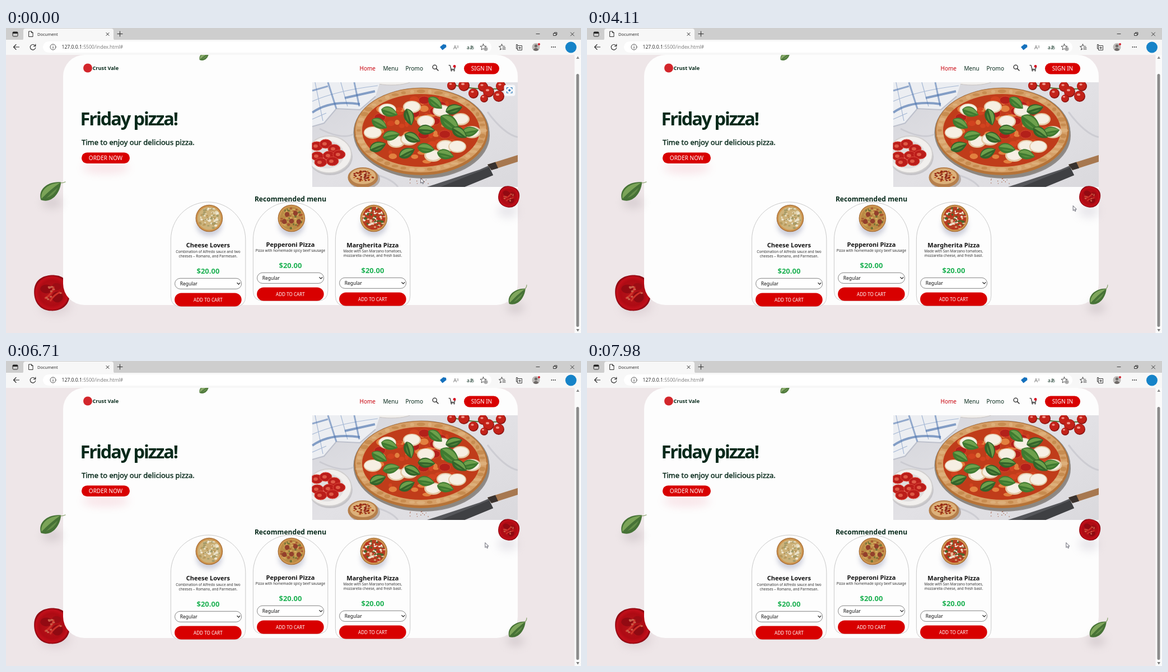
These frames come from a looping animation (1027x545 px, 8000 ms). An HTML page:

```html
<!DOCTYPE html>
<html lang="en">
<head>
<meta charset="utf-8">
<title>Pizza shop</title>
<style>
  html, body { margin: 0; width: 100%; height: 100%; overflow: hidden; background: #eee6e8; }
  svg { display: block; width: 1027px; height: 545px; }
  text { font-family: "Noto Sans", "Open Sans", sans-serif; fill: #06291a; }
  .ui { font-family: "Open Sans", "Noto Sans", sans-serif; fill: #222; }
  .mid { text-anchor: middle; }
  .bold { font-weight: 700; }
  .medium { stroke: #06291a; stroke-width: .4px; }
  .line { fill: none; stroke: #2b2b2b; stroke-linecap: round; stroke-linejoin: round; }
</style>
</head>
<body>
<svg id="stage" viewBox="0 0 1027 545" xmlns="http://www.w3.org/2000/svg"></svg>
<script>
const LOOP = 8000;
const RED = '#d80000';

let seed = 7;
const random = () => (seed = seed * 16807 % 2147483647) / 2147483647;
const between = (a, b) => a + (b - a) * random();
const times = (n, make) => Array.from({ length: n }, (_, i) => make(i)).join('');

const rect = (x, y, w, h, r, fill, extra = '') =>
  `<rect x="${x}" y="${y}" width="${w}" height="${h}" rx="${r}" fill="${fill}" ${extra}/>`;
const oval = (x, y, rx, ry, fill, extra = '') =>
  `<ellipse cx="${x}" cy="${y}" rx="${rx}" ry="${ry}" fill="${fill}" ${extra}/>`;
const dot = (x, y, r, fill, extra) => oval(x, y, r, r, fill, extra);
const shape = (d, fill, extra = '') => `<path d="${d}" fill="${fill}" ${extra}/>`;
const line = (d, width = 1, extra = '') => `<path class="line" d="${d}" stroke-width="${width}" ${extra}/>`;
const label = (x, y, size, words, cls = '', style = '') =>
  `<text x="${x}" y="${y}" font-size="${size}" class="${cls}" style="${style}">${words}</text>`;

// Leaf of half-length `size`, pointing along `angle`, with one half lit.
const leaf = (x, y, size, angle, fill, light, width = 1) =>
  `<g transform="translate(${x} ${y}) rotate(${angle}) scale(${size} ${size * width})">
    ${shape('M-1 .05C-.7-.75 .3-.75 1 0C.3 .7-.6 .75-1 .05', fill)}
    ${shape('M-.9 0C-.6-.55 .25-.6 .9-.02Q0-.1-.9 0', light)}
    ${shape('M-.6 .2Q0 .12 .55 .15Q0 .45-.6 .2', light, 'opacity=".55"')}</g>`;

// Random point inside an ellipse, as [x, y].
function scatter(cx, cy, rx, ry) {
  const a = between(0, Math.PI * 2), d = Math.sqrt(random());
  return [cx + Math.cos(a) * rx * d, cy + Math.sin(a) * ry * d];
}

function tomatoSlice(x, y, r, angle) {
  return `<g transform="translate(${x} ${y}) rotate(${angle}) scale(${r})">
    ${shape('M-.98-.1C-.95-.8-.4-1 .15-.98C.8-.95 1-.4 .98 .1C.95 .75 .45 1-.05 .98C-.6 .97-1 .55-.98-.1Z', 'url(#tomato)')}
    ${oval(-.3, -.22, .34, .24, '#920a12')}${oval(.3, .22, .3, .3, '#8f0a12')}${oval(.25, -.35, .25, .2, '#9c0d14')}
    ${shape('M-.4 .3Q0 .1 .1-.35M-.1 .45Q.1 .1 .45-.05', 'none', 'stroke="#cf3129" stroke-width=".1"')}
    ${times(10, () => { const [u, v] = scatter(0, 0, .5, .45); return oval(u, v, .07, .05, '#c9604a'); })}</g>`;
}

function browser() {
  return rect(0, 0, 1027, 22, 0, '#cecece') + rect(0, 21, 1027, 27, 0, '#f7f7f7') +
    shape('M27 22Q31 22 31 18V5Q31 1 35 1H188Q192 1 192 5V18Q192 22 196 22Z', '#f7f7f7') +
    rect(66, 24, 801, 20, 10, '#fff') +
    rect(12, 7, 9, 8, 1.5, 'none', 'stroke="#222"') + rect(12, 7, 9, 3, 1, '#222') +
    line('M41 6H45.5L48 8.5V15.5H41ZM45.5 6V8.5H48') +
    label(56, 13.5, 7.5, 'Document', 'ui') +
    line('M179 8.5L184 13.5M184 8.5L179 13.5M199 10.5H208M203.5 6V15') +
    line('M947 10.5H953M1008.5 8L1014.5 14M1014.5 8L1008.5 14', .9) +
    line('M978 9.5H982.5V13.5H978ZM979.5 9.5V8H984V12H982.5', .9) +
    line('M13.5 34H23.5M18 29.5L13.5 34L18 38.5', 1.1) +
    line('M52.3 32A4.8 4.8 0 1 0 52.8 35M52.8 29V32.5H49.2', 1.1) +
    `<circle cx="84" cy="34" r="5" class="line" stroke-width=".8"/>` + line('M84 33.5V36.5M84 31.5V31.6', .9) +
    label(99.5, 37.2, 8.6, '127.0.0.1<tspan fill="#777">:5500/index.html#</tspan>', 'ui') +
    shape('M775 34L781 29L786 30L786.5 34L779.5 39.5Z', '#1571bd') +
    label(799, 38, 9.5, 'A<tspan font-size="6" dy="-3">))</tspan>', 'ui', 'fill:#666') +
    label(823, 37.5, 8.5, 'aあ', '', 'font-family:"Open Sans","Noto Sans CJK JP",sans-serif;fill:#555') +
    line('M852.5 28.5L854 32.2L858 32.5L855 35L856 39L852.5 37L849 39L850 35L847 32.5L851 32.2Z', .8) +
    dot(857, 37.5, 3, '#f7f7f7', 'stroke="#555" stroke-width=".8"') + line('M855.5 37.5H858.5M857 36V39', .7) +
    line('M885.5 29L887 32.5L891 33M885.5 29L884 32.5L880.5 33L883.5 35.5L882.5 39L885 37.5M887 35.5H892M887 38H892', .9) +
    line('M913.5 31V29.5H911.5V37H913.5M914 31.5H921.5V39.5H914ZM917.7 33.5V37.5M915.7 35.5H919.7', .9) +
    dot(946.5, 34, 7, '#bdbab8') + dot(946.5, 32, 2.6, '#6d6967') + shape('M941.5 39Q946.5 32 951.5 39Q946.5 43 941.5 39', '#6d6967') +
    dot(952, 29, 2, '#d21f2b') +
    times(3, i => dot(974.5 + i * 3.2, 34, .9, '#222')) +
    dot(1009, 34.5, 10, '#1683c8');
}

function scrollbar() {
  return rect(1015.5, 48, 11.5, 497, 0, '#fafafa') + rect(1018.5, 82, 5, 452, 2.5, '#8b8b8b') +
    shape('M1018.5 55L1021.3 50.5L1024 55Z', '#888') + shape('M1018.5 538L1021.3 542.5L1024 538Z', '#777');
}

function pizzaPhoto() {
  const cheese = [[681, 146], [697, 203], [720, 199], [750, 167], [812, 163], [785, 211], [806, 212], [763, 228], [778, 148], [655, 187], [832, 186], [725, 141]];
  const basil = [[767, 134, 40], [800, 145, -15], [685, 150, 20], [720, 159, 75], [667, 171, 30], [726, 196, 25], [793, 170, 40], [664, 212, -20],
    [688, 192, -10], [751, 182, 5], [750, 215, 10], [716, 223, -25], [829, 185, -10], [810, 187, 35], [785, 226, 15]];
  const stripe = (d, width, opacity) => shape(d, 'none', `stroke="#4a72ae" stroke-opacity="${opacity}" stroke-width="${width}"`);
  return `<g clip-path="url(#photo)">
    ${rect(547, 97, 367, 187, 0, 'url(#marble)')}
    ${shape('M860 150Q890 190 914 195M560 180Q600 200 620 190M700 284Q690 270 660 262', 'none', 'stroke="#bcbcc3" stroke-width="3" opacity=".5"')}
    ${oval(688, 91, 40, 11, '#f0eeec', 'stroke="#c6c2c0"')}
    ${shape('M547 97H668L660 122L632 146L590 144L568 170L547 176Z', '#eceef2')}
    ${shape('M547 176L568 170L590 144L632 146L660 122', 'none', 'stroke="#aeb3c0" stroke-width="2" opacity=".7"')}
    ${stripe('M547 151Q580 128 632 136M605 125L659 113', 4, .65)}
    ${stripe('M575 97L590 144M622 97L631 140M547 112L575 104', 3, .55)}
    ${stripe('M552 97L566 166M598 97L610 140M547 131Q590 112 664 103M547 163L572 152', 1.2, .45)}
    ${oval(745, 192, 119, 77, '#5d5650', 'opacity=".6"')}${oval(742, 187, 121.5, 80.5, '#8d8780')}
    ${oval(741.5, 185, 119.5, 78, '#b67337')}${oval(741, 183, 117, 75, '#d6a068')}
    ${times(44, i => oval(741 + 111 * Math.cos(i / 7), 183 + 70 * Math.sin(i / 7), between(3, 8), between(2, 4), random() < .5 ? '#e3b987' : '#bf7f41', 'opacity=".6"'))}
    ${oval(741, 183, 105, 65, '#c03c1a')}
    ${times(60, () => { const [x, y] = scatter(741, 183, 97, 59); return oval(x, y, between(3, 9), between(2, 6), random() < .6 ? '#d2431f' : '#e2803f'); })}
    ${times(14, () => { const [x, y] = scatter(741, 183, 92, 55); return oval(x, y, 10, 7, '#b3201a', 'stroke="#d8452f"'); })}
    ${cheese.map(([x, y]) => oval(x, y, 16, 11, '#e4c9a6') + oval(x, y - .5, between(12, 15), between(8, 10), '#f6efe3')).join('')}
    ${basil.map(([x, y, a], i) => leaf(x, y, i === 6 ? 21 : 15.5, a, i % 2 ? '#33642a' : '#3f7a30', '#6da04c', 1.05)).join('')}
    ${shape('M790 99Q830 112 890 108', 'none', 'stroke="#56783a" stroke-width="2"')}
    ${[[796, 103, 8], [818, 103, 10], [835, 117, 9], [852, 105, 9], [862, 114, 10], [854, 126, 7], [884, 104, 9], [880, 122, 10]]
      .map(([x, y, r]) => dot(x, y, r, '#8e1512') + dot(x - .6, y - .8, r - 1, '#c32219') + oval(x - 2, y - 3, r * .3, r * .2, '#f0958a')).join('')}
    ${oval(579, 230, 40, 33, '#aaa7ab', 'opacity=".5"')}${oval(577, 226, 40, 33, '#f1efed', 'stroke="#d1cfcf" stroke-width="2"')}
    ${oval(573, 226, 31, 25, '#dfdddd')}
    ${[[555, 211], [571, 207], [586, 216], [556, 229], [577, 228], [595, 226], [562, 240], [583, 238]]
      .map(([x, y]) => oval(x, y, 11, 8, '#bb1d1a', 'stroke="#dd4a3c"') + oval(x - 2, y, 4, 3, '#de5a46')).join('')}
    ${oval(640, 270, 28, 18, '#8b7b70', 'opacity=".5"')}${oval(637.5, 267, 27, 18, '#b67f4b')}${oval(637.5, 265, 23, 14, '#dcb17a')}
    ${times(50, () => { const [x, y] = scatter(638, 265, 18, 10); return oval(x, y, 2, 1.2, random() < .6 ? '#8e2415' : '#c4692a'); })}
    ${shape('M752 284L846 253L862 246L870 263L819 284Z', '#55565a')}${shape('M776 284L863 249L870 263L819 284Z', '#3f4043')}
    ${shape('M860 244L914 227V239L867 254Z', '#a77850')}${shape('M860 244L874 239.5L879 250.5L867 254Z', '#39322f')}
    ${times(12, () => dot(between(715, 757), between(268, 278), .7, '#9b4a2c'))}</g>`;
}

function smallPizza(x, base, toppings) {
  return oval(x, 352, 23, 20, '#8589a8', 'opacity=".4" filter="url(#soft)"') +
    dot(x, 340, 24.3, '#a87038') + dot(x, 340, 23, '#cf9650') + dot(x, 340, 20.5, base) +
    times(80, i => { const [u, v] = scatter(x, 340, 19, 19); return oval(u, v, between(1.2, 3), between(1, 2.4), toppings[i % toppings.length]); });
}

// `titleY` and `dy` shift the heading block and the controls separately.
function product({ x, titleY, dy, name, lines, base, toppings, extras = '' }) {
  const mid = x + 66.5, bottom = 497.5 + dy;
  return `<path d="M${x} ${bottom - 18}V378A66.7 67 0 0 1 ${x + 133.4} 378V${bottom - 18}Q${x + 133.4} ${bottom} ${x + 115} ${bottom}H${x + 18}Q${x} ${bottom} ${x} ${bottom - 18}Z" fill="#fdfdfd" stroke="#bcbcbc" stroke-width=".8"/>` +
    smallPizza(x + 68.5, base, toppings) + extras +
    label(mid, 392 + titleY, 11.05, name, 'mid bold', 'fill:#111') +
    lines.map((words, i) => label(mid, 401.7 + titleY + i * 8, 6.43, words, 'mid', 'fill:#333')).join('') +
    label(mid, 438.5 + dy, 13, '$20.00', 'mid bold', 'fill:#1fb254') +
    rect(x + 7.2, 447.3 + dy, 119, 19, 9.5, '#fff', 'stroke="#777" stroke-width=".9"') +
    label(x + 16.3, 459.8 + dy, 8.5, 'Regular', '', 'fill:#111') +
    line(`M${x + 118.5} ${455.5 + dy}l2.5 2.7l2.5-2.7`, 1.2) +
    rect(x + 6.7, 473.5 + dy, 119.6, 24, 12, RED) +
    label(mid, 488.5 + dy, 8.12, 'ADD TO CART', 'mid', 'fill:#fff');
}

function header() {
  return dot(146, 71.5, 8, '#d3262b') + label(154.5, 75, 9.2, 'Crust Vale', 'bold') +
    label(631.5, 75.7, 10, 'Home', '', 'fill:#c8000c') + label(673.5, 75.7, 10, 'Menu') + label(713.5, 75.7, 10, 'Promo') +
    '<circle cx="765.7" cy="69.7" r="3.6" class="line" stroke-width="1.3"/>' + line('M768.5 72.5L772 76', 1.5) +
    line('M791 66.5H793L795 73.5H801L802.5 69M795 73.5L794.5 75H801.5', 1.2) +
    dot(795.5, 76.5, 1, '#222') + dot(800.5, 76.5, 1, '#222') + dot(801, 68.5, 2.4, '#d5001a') +
    rect(818, 62.5, 63, 20, 10, RED) + label(849.5, 76, 10, 'SIGN IN', 'mid', 'fill:#fff');
}

function page() {
  return rect(0, 47, 1027, 498, 0, '#eee6e8') +
    oval(88, 497, 28, 16, '#a58d98', 'opacity=".2" filter="url(#wide)"') + tomatoSlice(82, 473.5, 32.5, 0) +
    rect(102, 48, 812, 447, 38, '#fdfdfd') +
    leaf(354, 50.5, 10.5, -35, '#4f7a3c', '#8aab6c') + header() +
    label(132.5, 174, 32.5, 'Friday pizza!', 'bold', 'letter-spacing:-2.1px') +
    label(135, 208.7, 13, 'Time to enjoy our delicious pizza.', 'medium') +
    oval(178, 250, 42, 10, '#e0637b', 'opacity=".16" filter="url(#wide)"') +
    rect(135, 222.5, 86, 19.5, 9.75, RED) + label(178, 236, 10, 'ORDER NOW', 'mid', 'fill:#fff') +
    pizzaPhoto() + label(508, 310, 12.1, 'Recommended menu', 'mid bold') +
    product({ x: 294.4, titleY: 0, dy: 0, name: 'Cheese Lovers',
      lines: ['Combination of Alfredo sauce and two', 'cheeses – Romano, and Parmesan.'],
      base: '#cdb27a', toppings: ['#e4d9b8', '#b9995c', '#efe7d2', '#a39a68'] }) +
    product({ x: 441.4, titleY: -1.5, dy: -10, name: 'Pepperoni Pizza',
      lines: ['Pizza with homemade spicy beef sausage'],
      base: '#b98a45', toppings: ['#d3a85e', '#6f7135', '#a9552f', '#c8a052'],
      extras: [[502, 333], [517, 331], [510, 345], [497, 346], [523, 346]].map(([x, y]) => dot(x, y, 4.3, '#93402c')).join('') }) +
    product({ x: 588.4, titleY: -.5, dy: -1, name: 'Margherita Pizza',
      lines: ['Made with San Marzano tomatoes,', 'mozzarella cheese, and fresh basil.'],
      base: '#b53e22', toppings: ['#f0e6d8', '#bd2f1d', '#47682c', '#e6bd98'] }) +
    oval(82, 312, 18, 10, '#a59aa0', 'opacity=".32" filter="url(#wide)"') +
    leaf(80, 291, 24, -40, '#467236', '#7ba458', .95) + line('M97 277Q102 277 106 275', 1.2, 'style="stroke:#809b63"') +
    oval(896, 327, 18, 12, '#a8a2b4', 'opacity=".25" filter="url(#wide)"') + tomatoSlice(898, 301.5, 19.3, 20) +
    oval(910, 500, 16, 9, '#a59aa0', 'opacity=".35" filter="url(#wide)"') +
    leaf(913, 479, 20, -42, '#467236', '#7fa65c', .9) + line('M926 467Q930 464 930 459', 1.1, 'style="stroke:#809b63"') +
    scrollbar();
}

const defs = `<defs>
  <linearGradient id="marble" x2="1" y2="1"><stop stop-color="#d3d4da"/><stop offset=".5" stop-color="#e2e1e5"/><stop offset="1" stop-color="#dad9dd"/></linearGradient>
  <radialGradient id="tomato"><stop stop-color="#b5161b"/><stop offset=".7" stop-color="#ae0b14"/><stop offset=".9" stop-color="#c20f1a"/><stop offset="1" stop-color="#8c0812"/></radialGradient>
  <filter id="soft" x="-50%" y="-50%" width="200%" height="200%"><feGaussianBlur stdDeviation="4"/></filter>
  <filter id="wide" x="-80%" y="-150%" width="260%" height="400%"><feGaussianBlur stdDeviation="8"/></filter>
  <clipPath id="photo"><rect x="546.5" y="97" width="367.5" height="187"/></clipPath></defs>`;

const searchButton = `<g id="search">${rect(889.5, 101.5, 20, 20, 4, '#f5f7fa')}
  ${line('M894.5 109V106.5H897M901.5 106.5H904V109M904 113.5V116H901.5M897 116H894.5V113.5', 1.2, 'style="stroke:#2476b8"')}
  ${dot(899.3, 111.3, 2, '#2476b8')}</g>`;
const arrow = '<path id="cursor" d="M0 0V8.7L2 6.9L3.4 10L4.9 9.3L3.5 6.4H6.2Z" fill="#fff" stroke="#3f4050" stroke-width=".8" stroke-linejoin="round"/>';

document.getElementById('stage').innerHTML = defs + page() + browser() + searchButton + arrow;
const search = document.getElementById('search');
const cursor = document.getElementById('cursor');

// The pointer jumps: [start time, x, y].
const stops = [
  [0, 740.8, 268.5], [770, 861, 325], [2110, 864.3, 322.7], [2140, 866.5, 320], [2170, 868.2, 317.6],
  [6410, 864, 320.5], [6440, 860, 323], [6710, 855.8, 324.6]
];

function draw(now) {
  const t = now % LOOP;
  const [, x, y] = stops.findLast(stop => stop[0] <= t);
  cursor.setAttribute('transform', `translate(${x} ${y})`);
  search.style.display = t < 770 ? '' : 'none';
}

const start = performance.now();
function tick() {
  draw(Math.max(0, performance.now() - start));
  requestAnimationFrame(tick);
}
tick();
</script>
</body>
</html>
```
